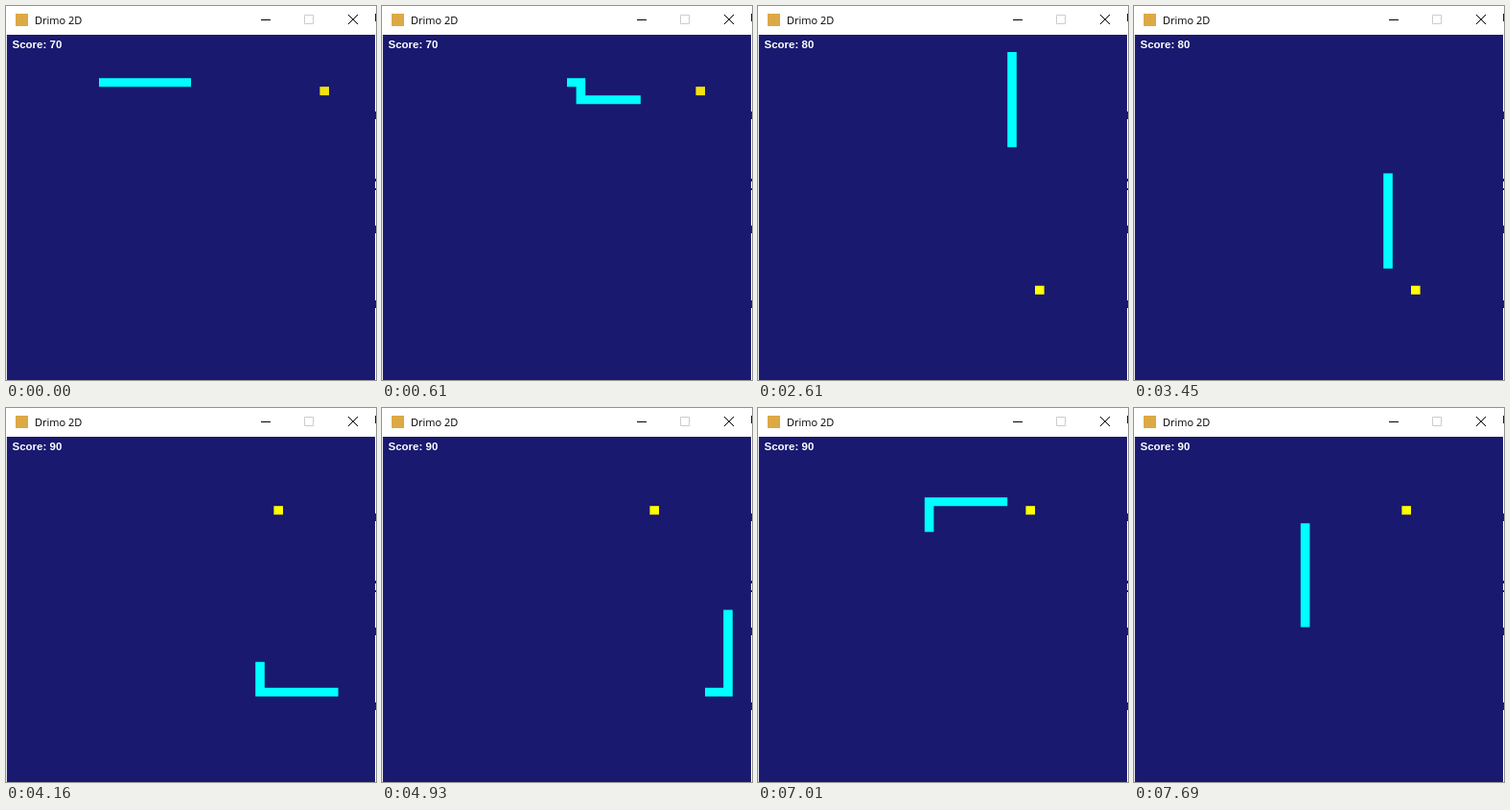
Recreate the animation shown at these times as an HTML page. Size 386 px wide and 390 px high, loop 7.77 s.

```html
<!DOCTYPE html>
<html lang="en">
<head>
<meta charset="utf-8">
<title>Drimo 2D</title>
<style>
  html, body { margin: 0; width: 100%; height: 100%; overflow: hidden; background: #fff; }
  svg { display: block; width: 386px; height: 390px; }
  .title { font: 11px "Open Sans", "Noto Sans", sans-serif; }
  .score { font: bold 11.5px "Liberation Sans", Arial, sans-serif; fill: #fff; }
</style>
</head>
<body>
<svg viewBox="0 0 386 390">
  <rect width="386" height="390" fill="#fff"/>
  <rect x="10" y="8" width="13" height="13" fill="#dca945"/>
  <text class="title" x="30" y="19">Drimo 2D</text>
  <g fill="none" stroke="#000">
    <path d="M266 14.5h10"/>
    <path d="M311.5 9.5h9v9h-9z" stroke="#ccc"/>
    <path d="M357 9l10 10M367 9l-10 10"/>
  </g>
  <rect y="30" width="1" height="360" fill="#e4e4ea"/>
  <rect x="1" y="30" width="384" height="360" fill="#191970"/>
  <path d="M385.5 8v8m0 94v8m0 62v3m0 7v2m0 37v8m0 70v8" stroke="#222"/>
  <text class="score" id="score" x="6.5" y="44"></text>
  <g transform="translate(1 30) scale(9.6 9.025)">
    <path id="food"/>
    <path id="snake" fill="#0ff"/>
  </g>
</svg>
<script>
const LOOP = 7770;
const REFRESH = 76.9;       // ms between screen refreshes
const REFRESH_LEAD = 12;
const LAST_REFRESH = 100;
const START_LENGTH = 10;
const START_CELL = [10, 5];
const TURNS = 'R11 D2 R13 U7 L7 D29 R10 U22 L19 D18';
const STEPS = { R: [1, 0], L: [-1, 0], D: [0, 1], U: [0, -1] };

// Moves made by a given refresh; the game slows briefly past the middle.
const PACE = [[0, 0], [54, 68], [64, 79.3], [LAST_REFRESH, 125]];

// Each food lasts until the given move; eating it adds a segment.
const foods = [
  { cell: [34, 6], eaten: 18, color: '#f2e30c' },
  { cell: [30, 29], eaten: 63, color: '#ff0' },
  { cell: [29, 8], eaten: Infinity, color: '#ff0' }
];

function buildRoute() {
  let [x, y] = START_CELL;
  const route = [[x, y]];
  for (const turn of TURNS.split(' ')) {
    const [dx, dy] = STEPS[turn[0]];
    for (let count = Number(turn.slice(1)); count > 0; count--) {
      route.push([x += dx, y += dy]);
    }
  }
  return route;
}

function movesAt(time) {
  const refresh = Math.min(Math.floor((time + REFRESH_LEAD) / REFRESH), LAST_REFRESH);
  const next = Math.max(1, PACE.findIndex(([r]) => r >= refresh));
  const [r0, m0] = PACE[next - 1];
  const [r1, m1] = PACE[next];
  return Math.round(m0 + (m1 - m0) * (refresh - r0) / (r1 - r0));
}

const route = buildRoute();
const [snake, food, score] =
  ['snake', 'food', 'score'].map(id => document.getElementById(id));
const cellPath = ([x, y]) => `M${x} ${y}h1v1h-1z`;

function draw(time) {
  const moves = movesAt(time);
  const eaten = foods.filter(f => moves >= f.eaten).length;
  const end = START_LENGTH + moves;
  const body = route.slice(end - START_LENGTH - eaten, end);
  snake.setAttribute('d', body.map(cellPath).join(''));
  food.setAttribute('d', cellPath(foods[eaten].cell));
  food.setAttribute('fill', foods[eaten].color);
  score.textContent = `Score: ${70 + eaten * 10}`;
}

const startTime = performance.now();
function tick() {
  draw((performance.now() - startTime) % LOOP);
  requestAnimationFrame(tick);
}
tick();
</script>
</body>
</html>
```
